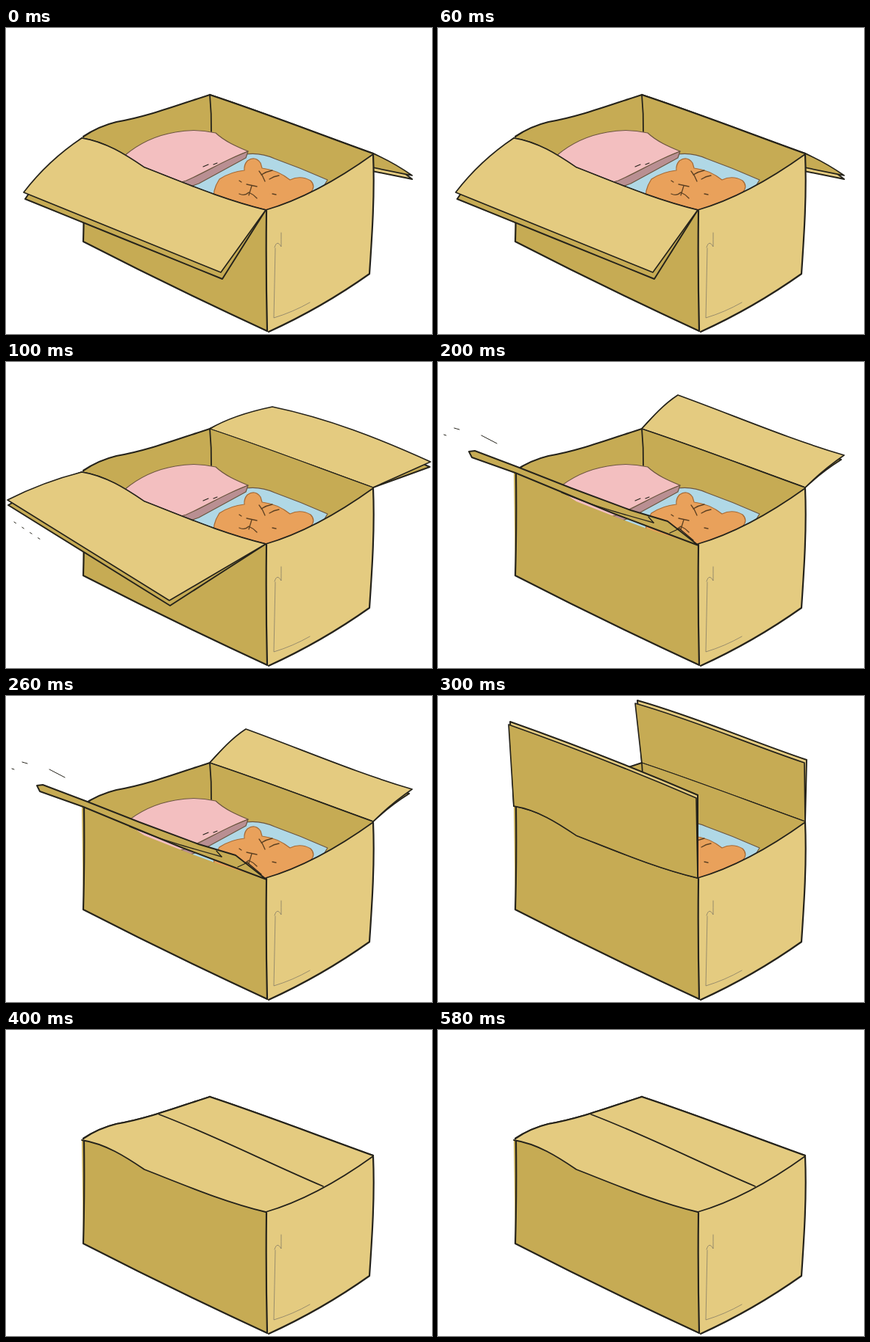
Write an HTML page that moves like this. It is 579 px wide and 417 px high and loops after 700 ms.

```html
<!DOCTYPE html>
<html lang="en">
<head>
<meta charset="utf-8">
<title>Closing box</title>
<style>
  html, body { margin: 0; width: 100%; height: 100%; overflow: hidden; background: #fff; }
  svg { display: block; width: 100vw; height: 100vh; }
  path { stroke-linecap: round; stroke-linejoin: round; }
</style>
</head>
<body>
<svg id="stage" viewBox="0 0 579 417" preserveAspectRatio="none"></svg>
<script>
const DARK = '#c6ab54', LIGHT = '#e4cb80', INK = '#25231b', SCRIBBLE = '#777163';
const PINK = '#f3bfc0', MAUVE = '#b98f92', BLUE = '#b0d8e6', ORANGE = '#e9a15b';
const SOFT = '#6b553f', FUR = '#a66a35', FACE = '#5c4022';

// Corners as "x y", joined by hand-drawn edges. "x y a b" bends the edge
// that ends there by a and b at its two thirds (positive: right of travel).
function trace(text) {
  let d = '', x = 0, y = 0;
  for (const corner of text.split(',')) {
    const [u, v, a = 0, b = a] = corner.trim().split(/\s+/).map(Number);
    const dx = u - x, dy = v - y, len = Math.hypot(dx, dy) || 1;
    const ctrl = (t, off) => `${x + dx * t - dy / len * off} ${y + dy * t + dx / len * off}`;
    d += d ? `C${ctrl(1 / 3, a)} ${ctrl(2 / 3, b)} ${u} ${v}` : `M${u} ${v}`;
    x = u;
    y = v;
  }
  return d;
}
const shape = (pts, color, w = 0, ink = INK) =>
  `<path d="${trace(pts)}Z" fill="${color}" stroke="${w ? ink : 'none'}" stroke-width="${w}"/>`;
const line = (pts, w = 2.2, ink = INK, dash = 'none') =>
  `<path d="${trace(pts)}" fill="none" stroke="${ink}" stroke-width="${w}" stroke-dasharray="${dash}"/>`;
const shift = (corner, dx, dy) => {
  const [x, y, ...bend] = corner.split(' ').map(Number);
  return [x + dx, y + dy, ...bend].join(' ');
};

// Box edges
const LEFT = '105 148, 150 128 -3, 277 91 5 1';
const BACK = '277 91, 499 171 -2 0';
const RIM = LEFT + ', 499 171 -2 0';
const FRONT = '103 150, 188 190 -9 -5, 353 248 2 6';
const SIDE = '353 248, 499 172 11 8';

// Flap on a hinge: the far edge runs from tip `a` to tip `b`, then bends home;
// the slab is the same outline moved by the board's thickness.
function flap(hinge, a, b, home, [dx, dy], face, slab) {
  const close = hinge.split(',')[0] + ' ' + home;
  return shape([hinge, shift(a, dx, dy), shift(b, dx, dy), close].join(','), slab, 2) +
    shape([hinge, a, b, close].join(','), face) +
    line([hinge.split(',').pop().trim().split(' ', 2).join(' '), a, b, close].join(','), 1.7) +
    line(hinge, 1.3);
}

const inside = shape(RIM + ', 499 260, 353 330, 105 220', DARK) +
  line(LEFT) + line('277 91, 279 143 -1', 1.8);

const contents =
  shape('325 172, 365 178 -4, 437 207 -1, 417 240, 250 240, 245 208', BLUE, 1.2, SOFT) +
  shape('329 168, 326 177, 262 212, 235 222, 240 205', MAUVE, 1.2, SOFT) +
  shape('161 174, 230 142 -7, 285 143 -4, 329 168 4 2, 245 208 3 -1, 220 215', PINK, 1.2, SOFT) +
  line('268 189, 275 186', 1.2) + line('282 186, 287 184', 1.2) +
  shape('281 245, 283 222, 290 206 -1, 324 194 -3, 328 181 -2, 346 184 -6, 348 191, ' +
    '386 207 -4, 414 208 -5, 414 224 -5, 385 255', ORANGE, 1.2, FUR) +
  ['327 213, 341 216', '334 215, 330 228', '317 226, 330 224 3, 341 232 -1', '317 208, 320 210',
    '362 226, 367 227', '344 195, 352 209 -1', '347 200, 362 194 -1', '358 206, 371 201 -1']
    .map(s => line(s, 1.3, FACE)).join('');

const body =
  shape(FRONT + ', 355 413, 105 291 -2', DARK) +
  shape(SIDE + ', 494 335 -4 -2, 357 414 -5, 355 413', LIGHT) +
  line('106 151, 105 291 -1, 355 413 2') +
  line('499 172, 494 335 -4 -2, 357 414 -5') +
  line('354 249, 355 413 1') + line(SIDE, 1.8) +
  line('374 279, 374 298, 365 299 7', .7, SCRIBBLE) +
  line('366 300, 364 395, 413 374 2', .7, SCRIBBLE);

// Poses from open to closed
const poses = [
  {
    back: flap(BACK, '552 201 -2', '400 170', '', [0, 5], DARK, LIGHT),
    rim: 2.2,
    front: flap(FRONT, '292 333', '24 224', '-6', [2, 9], LIGHT, DARK)
  },
  {
    back: flap(BACK, '577 136', '362 61 7 10', '4 6', [-1, 7], LIGHT, DARK),
    rim: 1.2,
    front: flap(FRONT, '222 325', '2 188', '-4', [1, 7], LIGHT, DARK) +
      line('11 218, 47 242', 1, INK, '3 10')
  },
  {
    back: flap(BACK, '552 127 -2', '326 45 -5 0', '4 2', [-4, 6], LIGHT, DARK),
    rim: 1.8,
    front: shape('42 122, 50 121, 108 143, 262 202 1, 312 217, 354 250, 240 207 0, 105 151, 46 130', DARK, 1.9) +
      line('168 178, 293 219 4 2', 1.3) + line('293 219, 286 211', 1.3) +
      line('315 233, 328 227, 347 243', 1.3) +
      line('8 99, 11 100', 1) + line('22 90, 29 92', 1) + line('59 100, 80 111', 1)
  },
  {
    back: flap(BACK, '498 91', '268 10 -1 5', '', [3, -4], DARK, LIGHT),
    rim: 1.3,
    front: flap(FRONT, '351 139', '96 39 3', '', [2, -4], DARK, LIGHT)
  },
  {
    back: '',
    rim: 2.2,
    lid: shape(RIM + ', 499 260, 353 330, 105 220', LIGHT) + line(LEFT) + line(BACK) +
      line('208 115, 431 213 -4 1', 1.7),
    front: line(FRONT, 1.8)
  }
];

const stage = document.getElementById('stage');
stage.innerHTML = poses.map(p => '<g>' + p.back + inside + line(BACK, p.rim) +
  contents + (p.lid || '') + body + p.front + '</g>').join('');
const groups = [...stage.children];

const LOOP = 700, STEP = 100;
function draw(ms) {
  const now = Math.min(poses.length - 1, Math.floor(ms % LOOP / STEP));
  groups.forEach((g, i) => g.style.display = i === now ? '' : 'none');
}

const start = performance.now();
function tick() {
  draw(performance.now() - start);
  requestAnimationFrame(tick);
}
draw(0);
requestAnimationFrame(tick);
</script>
</body>
</html>
```
